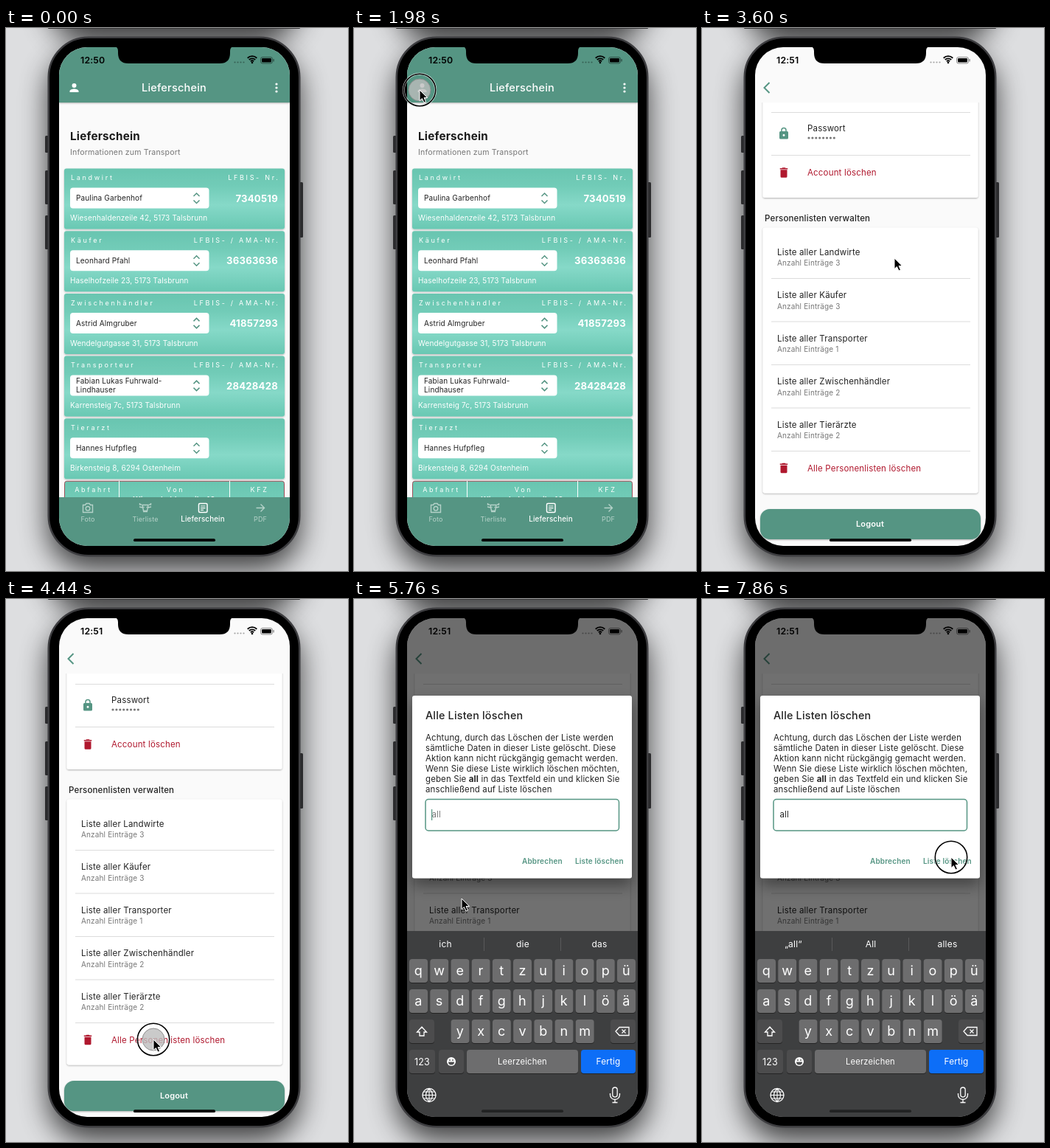
These frames come from a looping animation (464 px wide and 736 px high, 8000 ms). An HTML page:

```html
<!DOCTYPE html>
<html lang="de">
<head>
<meta charset="utf-8">
<title>Lieferschein</title>
<style>
html, body { margin: 0; width: 100%; height: 100%; overflow: hidden; background: #dddee0; }
svg { display: block; width: 100vw; height: 100vh; font-family: Inter, Roboto, sans-serif; }
text { white-space: pre; letter-spacing: .015em; }
text.spaced { letter-spacing: 2.7px; }
</style>
</head>
<body>
<svg id="stage" viewBox="0 0 464 736"></svg>
<script>
const GREEN = '#559583', RED = '#b0182e', INK = '#222', GREY = '#777';
const LOOP = 8000, STEP = 60;

// Drawing helpers: y of a text is its visual middle.
const text = (x, y, str, size, fill = INK, weight = 400, anchor = 'start', extra = '') =>
  `<text x="${x}" y="${y + size * 0.36}" font-size="${size}" fill="${fill}" font-weight="${weight}" text-anchor="${anchor}" ${extra}>${str}</text>`;
const mid = (x, y, str, size, fill, weight) => text(x, y, str, size, fill, weight, 'middle');
const spaced = (x, y, str, anchor) => text(x, y, str, 9, '#fff', 400, anchor, 'class="spaced"');
const rect = (x, y, w, h, fill, r = 0, extra = '') =>
  `<rect x="${x}" y="${y}" width="${w}" height="${h}" rx="${r}" fill="${fill}" ${extra}/>`;
const circle = (x, y, r, fill, extra = '') => `<circle cx="${x}" cy="${y}" r="${r}" fill="${fill}" ${extra}/>`;
const line = (d, stroke, width = 1.5, extra = '') =>
  `<path d="${d}" fill="none" stroke="${stroke}" stroke-width="${width}" ${extra}/>`;
const group = (id, body, extra = '') => `<g id="${id}" ${extra}>${body}</g>`;
const range = n => [...Array(n).keys()];

const ICONS = {
  person: 'M12 12a4 4 0 1 0 0-8 4 4 0 0 0 0 8zm0 2c-2.7 0-8 1.3-8 4v2h16v-2c0-2.7-5.3-4-8-4z',
  mail: 'M20 4H4a2 2 0 0 0-2 2v12a2 2 0 0 0 2 2h16a2 2 0 0 0 2-2V6a2 2 0 0 0-2-2zm0 4-8 5-8-5V6l8 5 8-5z',
  lock: 'M18 8h-1V6a5 5 0 0 0-10 0v2H6a2 2 0 0 0-2 2v10a2 2 0 0 0 2 2h12a2 2 0 0 0 2-2V10a2 2 0 0 0-2-2zM9 8V6a3 3 0 0 1 6 0v2zm3 9a2 2 0 1 1 0-4 2 2 0 0 1 0 4z',
  trash: 'M6 19a2 2 0 0 0 2 2h8a2 2 0 0 0 2-2V7H6zM19 4h-3.5l-1-1h-5l-1 1H5v2h14z'
};
const icon = (name, x, y, fill, scale = 0.75) =>
  `<path d="${ICONS[name]}" fill="${fill}" fill-rule="evenodd" transform="translate(${x} ${y}) scale(${scale}) translate(-12 -12)"/>`;

function statusBar() {
  const arcs = [3, 6, 9].map(r => `M${334 - r * 0.7} ${47.5 - r * 0.75}A${r} ${r} 0 0 1 ${334 + r * 0.7} ${47.5 - r * 0.75}`).join('');
  return text(101, 44, '12:50', 12.3, '#000', 600, 'start', 'id="clock"') +
    range(4).map(i => circle(310.5 + i * 4, 46.5, 1.1, '#000', 'opacity=".35"')).join('') +
    line(arcs, '#000', 1.8) + circle(334, 47, 1.3, '#000') +
    rect(345.5, 39.5, 16, 8.5, 'none', 2.5, 'stroke="#000" stroke-opacity=".45"') +
    rect(347, 41, 13, 5.5, '#000', 1.3) + rect(362.5, 42, 1.2, 3.5, '#000', 0.6, 'opacity=".5"');
}

function deliveryCard([role, name, address, number], i) {
  const y = 190.5 + i * 84.7;
  const lines = name.split('|');
  return rect(79, y, 299, 82, 'url(#mint)', 3, 'filter="url(#soft)"') + spaced(88, y + 12.5, role) +
    rect(87, y + 26, 188.5, 28, '#fff', 4) +
    lines.map((s, k) => text(95, y + 40 + (k - (lines.length - 1) / 2) * 12, s, 10)).join('') +
    line(`M254.5 ${y + 37.5}l4-4 4 4M254.5 ${y + 43}l4 4 4-4`, GREEN, 1.5) +
    text(87, y + 67, address, 10, '#fff') +
    (number ? spaced(371.5, y + 12.5, i ? 'LFBIS- / AMA-Nr.' : 'LFBIS- Nr.', 'end') +
      text(369, y + 40.5, number, 13.2, '#fff', 700, 'end') : '');
}

function deliveryPage() {
  const cards = [
    ['Landwirt', 'Paulina Garbenhof', 'Wiesenhaldenzeile 42, 5173 Talsbrunn', '7340519'],
    ['Käufer', 'Leonhard Pfahl', 'Haselhofzeile 23, 5173 Talsbrunn', '36363636'],
    ['Zwischenhändler', 'Astrid Almgruber', 'Wendelgutgasse 31, 5173 Talsbrunn', '41857293'],
    ['Transporteur', 'Fabian Lukas Fuhrwald-|Lindhauser', 'Karrensteig 7c, 5173 Talsbrunn', '28428428'],
    ['Tierarzt', 'Hannes Hufpfleg', 'Birkensteig 8, 6294 Ostenheim', '']
  ];
  const columns = [[118.5, 'Abfahrt'], [230, 'Von'], [344, 'KFZ']];
  const faint = '#b5d2c9';
  const tabs = [[111, 'Foto'], [189, 'Tierliste'], [267, 'Lieferschein'], [345, 'PDF']];
  return rect(72, 26, 313, 676, '#fafafa') +
    text(87, 147, 'Lieferschein', 15.2, '#1b1b1b', 700) +
    text(87, 168.5, 'Informationen zum Transport', 10.6, GREY) +
    cards.map(deliveryCard).join('') +
    rect(79.5, 614.3, 298, 80, 'url(#mint)', 3, 'stroke="#9b4d57"') +
    line('M153.5 614V640M303.5 614V640', '#fff', 1) +
    columns.map(([x, s]) => spaced(x, 626, s, 'middle')).join('') +
    mid(228, 639, 'Wiesenhaldenzeile 42', 10, '#fff', 700) +
    rect(72, 26, 313, 75, GREEN, 0, 'filter="url(#soft)"') +
    mid(228, 81, 'Lieferschein', 14.5, '#fff', 500) + icon('person', 92.5, 81, '#fff') +
    [76, 81, 86].map(y => circle(367, y, 1.6, '#fff')).join('') +
    rect(72, 636, 313, 66, GREEN) +
    tabs.map(([x, s]) => s === 'Lieferschein' ? mid(x, 665.5, s, 9.8, '#fff', 500) : mid(x, 665.5, s, 9, faint)).join('') +
    line('M104.5 646.5h3l1.5-2h4l1.5 2h3v10h-13zM108.2 651.3a2.8 2.8 0 1 0 5.6 0a2.8 2.8 0 1 0-5.6 0', faint, 1.4) +
    line('M184 646h-2.5v-2M194 646h2.5v-2M185 646.5h8l-1.5 8h-5zM181 649l4 1M197 649l-4 1M186 655.5h6', faint, 1.4) +
    circle(187, 649.5, 0.8, faint) + circle(191, 649.5, 0.8, faint) +
    rect(261.5, 644.5, 11.5, 12, 'none', 1.5, 'stroke="#fff" stroke-width="1.5"') +
    line('M264 648h6.5M264 650.7h6.5M264 653.4h4', '#fff', 1.2) +
    line('M339.5 650.5h11M345.5 645.5l5 5-5 5', faint, 1.4);
}

const cow =
  '<path d="M217 143q-8-3-10 0q0 7 10 8z" fill="#c9c9c9"/><path d="M239 143q8-3 10 0q0 7-10 8z" fill="#aaa"/>' +
  '<path d="M220 142q-6-5-2-12q0 6 7 9zM236 142q6-5 2-12q0 6-7 9z" fill="#222"/>' +
  '<path d="M228 138h-7q-4 1-4 8l3 21h8z" fill="#e8e8e8"/><path d="M228 138h7q4 1 4 8l-3 21h-8z" fill="#c6c6c6"/>' +
  '<rect x="216" y="159.5" width="24" height="13" rx="6.5" fill="#aaa"/><path d="M228 159.5h5.5a6.5 6.5 0 0 1 0 13H228z" fill="#919191"/>' +
  [[222, 152, 1.7], [234, 152, 1.7], [223, 166, 2.1], [233, 166, 2.1]].map(([x, y, r]) => circle(x, y, r, '#222')).join('');

function profileContent() {
  const card = (y, h) => rect(82.5, y, 292, h, '#fff', 3, 'filter="url(#soft)"');
  const rule = y => rect(94, y, 270, 1, '#dcdcdc');
  const row = (x, y, title, sub) => text(x, y, title, 11.5) + text(x, y + 15, sub, 10, GREY);
  const lists = [['Landwirte', 3], ['Käufer', 3], ['Transporter', 1], ['Zwischenhändler', 2], ['Tierärzte', 2]];
  return circle(228, 152, 50.5, 'none', `stroke="${GREEN}" stroke-width="1.5"`) + cow +
    mid(228.5, 231, 'Mona', 17, '#1b1b1b', 700) + mid(228, 250.5, 'kuh@kuh.test', 10, '#888') +
    text(85, 288.5, 'Account Einstellungen', 11.5, INK, 500) + card(302, 243) +
    icon('person', 111, 341.5, GREEN) + row(143, 334.5, 'Name', 'Mona') + rule(370) +
    icon('mail', 111, 400, GREEN) + row(143, 393, 'E-Mail', 'kuh@kuh.test') + rule(429) +
    icon('lock', 111, 458, GREEN) + text(143, 451, 'Passwort', 11.5) +
    range(8).map(i => circle(145 + i * 4.9, 464, 1.6, GREY)).join('') + rule(487) +
    icon('trash', 111, 511, RED) + text(143, 511, 'Account löschen', 11.5, RED) +
    text(85, 572.5, 'Personenlisten verwalten', 11.5, INK, 500) + card(585.5, 360) +
    lists.map(([s, n], i) => row(102, 618.5 + i * 58.5, 'Liste aller ' + s, 'Anzahl Einträge ' + n) + rule(654 + i * 58.5)).join('') +
    icon('trash', 111, 911.5, RED) + text(143, 911.5, 'Alle Personenlisten löschen', 11.5, RED) +
    rect(79, 967, 299, 41, GREEN, 13, 'filter="url(#soft)"') + mid(228, 987.5, 'Logout', 11, '#fff', 600);
}

const profilePage = rect(72, 26, 313, 676, '#fafafa') +
  `<g clip-path="url(#below)">${group('scroller', profileContent())}</g>` +
  line('M91.5 74l-7 7 7 7', GREEN, 2);

function dialog() {
  const lines = ['Achtung, durch das Löschen der Liste werden', 'sämtliche Daten in dieser Liste gelöscht. Diese',
    'Aktion kann nicht rückgängig gemacht werden.', 'Wenn Sie diese Liste wirklich löschen möchten,',
    'geben Sie <tspan font-weight="700">all</tspan> in das Textfeld ein und klicken Sie', 'anschließend auf Liste löschen'];
  return rect(79, 245, 298, 247.5, '#fff', 3, 'filter="url(#lift)"') +
    text(97, 271.5, 'Alle Listen löschen', 14.3, INK, 500) +
    lines.map((s, i) => text(97, 301.5 + i * 14, s, 11.4)).join('') +
    rect(97, 385.5, 262.5, 42.5, 'none', 4, 'id="field"') +
    text(105.5, 406, 'all', 11.4, GREY, 400, 'start', 'id="typed"') +
    rect(105, 399, 1.2, 15, GREEN, 0, 'id="caret"') +
    text(228, 469, 'Abbrechen', 10, GREEN, 600) + text(300, 469, 'Liste löschen', 10, GREEN, 600);
}

function keyboard() {
  const key = (x, y, w, label, size = 18, fill = '#6d6d6e') =>
    rect(x, y + 1, w, 32, '#242424', 4) + rect(x, y, w, 32, fill, 4) + mid(x + w / 2, y + 16, label, size, '#fff');
  const row = (letters, x, y) => [...letters].map((c, i) => key(x + i * 28.2, y, 25, c)).join('');
  const dark = '#4c4c4d';
  return rect(72, 450, 313, 252, '#3e3f40') + line('M176.5 459V477M280.5 459V477', '#5a5a5b', 1) +
    [124, 229, 333].map((x, i) => text(x, 468, '', 12, '#fff', 400, 'middle', `id="hint${i}"`)).join('') +
    row('qwertzuiopü', 75, 488) + row('asdfghjklöä', 75, 529) + row('yxcvbnm', 131.5, 570) +
    key(75, 570, 34, '', 1, dark) + line('M92 580l-6.5 7h3.5v5h6v-5h3.5z', '#fff', 1.3) +
    key(348, 570, 34, '', 1, dark) + line('M360 580.5h13v11h-13l-5-5.5zM363.5 583.5l5 5M368.5 583.5l-5 5', '#fff', 1.3) +
    key(75, 611, 35, '123', 12.5, dark) + key(115, 611, 34, '', 1, dark) + circle(132, 627, 6, '#fff') +
    circle(130, 625, 0.9, dark) + circle(134, 625, 0.9, dark) + `<path d="M128 627.5h8a4 4 0 0 1-8 0z" fill="${dark}"/>` +
    key(153, 611, 151, 'Leerzeichen', 11.2) + key(308, 611, 74, 'Fertig', 11.8, '#0d6ef7') +
    circle(102, 672.5, 9, 'none', 'stroke="#fff" stroke-width="1.3"') +
    line('M93 672.5h18M102 663.5v18M94.5 668h15M94.5 677h15M102 663.5q-9 9 0 18q9-9 0-18', '#fff', 1.1) +
    rect(350.8, 662, 6.4, 13, 'none', 3.2, 'stroke="#fff" stroke-width="1.3"') +
    line('M347.5 670v2a6.5 6.5 0 0 0 13 0v-2M354 678.5v4M350.5 682.5h7', '#fff', 1.3);
}

const SCREEN = [72, 26, 313, 676];
// The lower end of another phone peeks in at the top edge, with its shadow.
const phoneShadow = top => rect(57, top + 20, 342, 702, '#000', 56, 'filter="url(#blur)" opacity=".72"');

stage.innerHTML = `<defs>
  <linearGradient id="mint" x2="0" y2="1"><stop stop-color="#69c5b0"/><stop offset=".3" stop-color="#72ccb8"/><stop offset=".6" stop-color="#86d9c8"/><stop offset="1" stop-color="#69c8b3"/></linearGradient>
  <filter id="soft" x="-5%" y="-20%" width="110%" height="150%"><feDropShadow dx="0" dy="1" stdDeviation="1" flood-opacity=".3"/></filter>
  <filter id="lift" x="-20%" y="-20%" width="140%" height="150%"><feDropShadow dx="0" dy="10" stdDeviation="10" flood-opacity=".4"/></filter>
  <filter id="blur" x="-30%" y="-20%" width="160%" height="140%"><feGaussianBlur stdDeviation="19"/></filter>
  <clipPath id="screen">${rect(...SCREEN, '#000', 38)}</clipPath>
  <clipPath id="below">${rect(72, 101, 313, 601, '#000')}</clipPath></defs>` +
  rect(0, 0, 464, 736, '#dddee0') + phoneShadow(-702) + phoneShadow(12) +
  rect(57, -2, 342, 3, '#3a3a3c', 1) +
  [[53, 146, 23], [53, 193, 46], [53, 254, 46], [398, 209, 75]].map(([x, y, h]) => rect(x, y, 5, h, '#2b2b2d', 1.5)).join('') +
  rect(57.8, 12.8, 340.4, 702.4, '#000', 54, 'stroke="#3d3d40" stroke-width="2.6"') +
  group('display', group('delivery', deliveryPage()) + group('profile', profilePage) + statusBar() +
    group('modal', rect(...SCREEN, '#000', 0, 'opacity=".56"') + group('dialog', dialog())) +
    group('keyboard', keyboard()) + rect(173, 692.3, 111, 3.8, '#000', 1.9, 'id="homebar"'), 'clip-path="url(#screen)"') +
  '<path d="M146 25q6 0 6 6v3q0 14 14 14h124q14 0 14-14v-3q0-6 6-6z" fill="#000"/>' +
  circle(270, 490, 6, '#ccc', 'id="trail" opacity=".55"') +
  circle(0, 0, 15, '#bdbdbd', 'id="touch" fill-opacity=".8" stroke="#8e8e8e"') +
  group('pointer', `<g id="ring">${circle(0, 0, 21.7, 'none', 'stroke="#fff" stroke-width="3" stroke-opacity=".7"')}${circle(0, 0, 21.7, 'none', 'stroke="#000" stroke-width="1.6"')}</g>` +
    '<path d="M0 0V14.5l3.4-3 2.6 5.6 2.5-1.1-2.5-5.5h4.6z" fill="#000" stroke="#fff"/>');

const $ = id => document.getElementById(id);
const show = (id, on) => $(id).style.display = on ? '' : 'none';
const within = (t, a, b) => t >= a && t < b;

// Eased interpolation over [time, ...values] keys.
function follow(keys, t) {
  const i = keys.findIndex(k => k[0] > t);
  if (i < 0) return keys[keys.length - 1].slice(1);
  if (!i) return keys[0].slice(1);
  const a = keys[i - 1], b = keys[i], p = (t - a[0]) / (b[0] - a[0]), e = p * p * (3 - 2 * p);
  return a.slice(1).map((v, k) => v + (b[k + 1] - v) * e);
}
// Latest value of [time, value] keys.
const latest = (keys, t) => keys.filter(k => k[0] <= t).pop()[1];

const POINTER = [[1320, 215, 270], [1860, 89, 84], [2400, 89, 84], [2700, 270, 490], [2760, 270, 461], [2820, 270, 424],
  [2999, 270, 424], [3000, 266, 350], [3240, 266, 350], [3360, 261, 312], [3660, 261, 312], [4020, 200, 597],
  [4740, 200, 597], [5220, 146, 406], [5880, 146, 406], [6000, 105, 510], [6239, 105, 510], [6240, 83, 549],
  [6659, 83, 549], [6660, 335, 549], [7080, 335, 549], [7680, 338, 350]];
const SCROLL = [[2999, 0], [3000, 130], [3240, 130], [3540, 315], [4200, 315], [4440, 314]];
const PRESSES = [[1920, 2280], [2760, 3300], [4200, 4620], [5340, 5760], [6240, 6600], [6660, 7140], [7860, LOOP]];
const TYPED = [[0, ''], [6660, 'a'], [6960, 'al'], [7140, 'all']];
const HINTS = { '': ['ich', 'die', 'das'], a: ['„a“', 'aber', 'auch'], al: ['„al“', 'als', 'alle'], all: ['„all“', 'All', 'alles'] };

function draw(now) {
  const t = Math.floor(now % LOOP / STEP) * STEP;
  const modal = t >= 4620, focused = t >= 5760, typed = latest(TYPED, t);
  const [x, y] = follow(POINTER, t), [scroll] = follow(SCROLL, t);

  show('delivery', t < 2280);
  show('profile', t >= 2280);
  show('modal', modal);
  show('keyboard', focused);
  $('homebar').setAttribute('opacity', modal ? 0.45 : 1);
  $('clock').textContent = t < 3300 ? '12:50' : '12:51';
  $('scroller').setAttribute('transform', `translate(0 ${-scroll})`);

  $('dialog').setAttribute('transform', `translate(0 ${focused ? -114 : 0})`);
  $('field').setAttribute('stroke', focused ? GREEN : '#8a8a8a');
  $('field').setAttribute('stroke-width', focused ? 1.5 : 1);
  $('typed').textContent = typed || 'all';
  $('typed').setAttribute('fill', typed ? INK : GREY);
  $('caret').setAttribute('x', [105, 112, 115, 118][typed.length]);
  show('caret', within(t, 5280, 7680));
  HINTS[typed].forEach((s, i) => $('hint' + i).textContent = s);

  show('pointer', t >= 1320);
  $('pointer').setAttribute('transform', `translate(${x} ${y})`);
  show('ring', PRESSES.some(([a, b]) => within(t, a, b)));
  show('touch', within(t, 1980, 2280) || within(t, 2760, 3300) || within(t, 4260, 4620));
  $('touch').setAttribute('transform', `translate(${x} ${within(t, 2820, 3000) ? 461 : y})`);
  show('trail', within(t, 2820, 3000));
  requestAnimationFrame(() => draw(performance.now() - start));
}
const start = performance.now();
draw(0);
</script>
</body>
</html>
```
